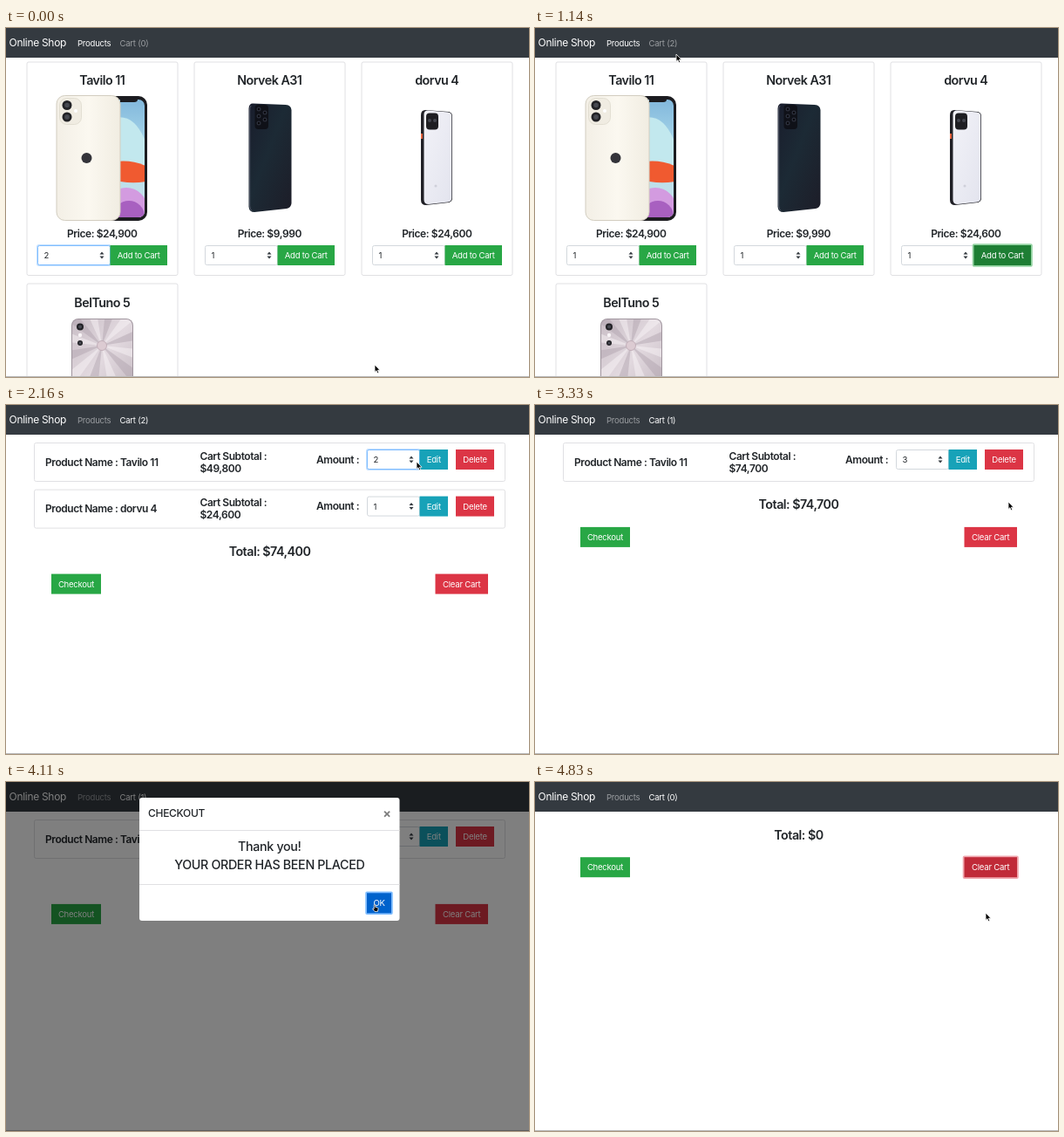
These frames come from a looping animation (600x400 px, 4980 ms). An HTML page:

```html
<!DOCTYPE html>
<html lang="en">
<head>
<meta charset="utf-8">
<title>Online Shop</title>
<style>
  html, body { margin: 0; width: 100%; height: 100%; overflow: hidden; background: #fff; }
  svg { display: block; width: 600px; height: 400px; }
  text { font-family: Inter, Roboto, sans-serif; letter-spacing: -.025em; white-space: pre; }
  text[font-weight="600"] { letter-spacing: -.036em; }
</style>
</head>
<body>
<svg viewBox="0 0 600 400">
  <defs>
    <linearGradient id="cream"><stop stop-color="#f3efe6"/><stop offset=".5" stop-color="#fbf8f0"/><stop offset="1" stop-color="#f1ede2"/></linearGradient>
    <linearGradient id="screen" x2="0" y2="1"><stop stop-color="#82b8dc"/><stop offset=".5" stop-color="#b4e0ee"/><stop offset="1" stop-color="#c9dfe6"/></linearGradient>
    <linearGradient id="night" x2="1" y2="1"><stop stop-color="#191d2c"/><stop offset=".45" stop-color="#1c2a35"/><stop offset="1" stop-color="#1d1d28"/></linearGradient>
    <linearGradient id="mint" x2="1" y2="1"><stop stop-color="#f2f2f8"/><stop offset="1" stop-color="#e3e4ee"/></linearGradient>
    <linearGradient id="silver" x2="1" y2="1"><stop stop-color="#c9bec6"/><stop offset=".5" stop-color="#e2d9df"/><stop offset="1" stop-color="#c4b9c1"/></linearGradient>
    <clipPath id="screenClip"><rect x="116" y="82" width="43" height="135" rx="7"/></clipPath>
    <clipPath id="silverClip"><rect x="76" y="334" width="69" height="90" rx="7"/></clipPath>
  </defs>
  <g id="view"></g>
  <g id="cursor"></g>
</svg>
<script>
const LOOP = 4980, STEP = 30;
const INK = '#212529', LINE = '#e0e0e3', WHITE = '#fff';
const SKIN = {
  green: ['#28a745', '#1e7e34', '#94d3a2'],
  red: ['#dc3545', '#c02a38', '#f0a6ad'],
  teal: ['#17a2b8', '#138496', '#8bd0db'],
  blue: ['#007bff', '#0062cc', '#80bdff']
};
const PHONES = ['Tavilo 11', 'Norvek A31', 'dorvu 4', 'BelTuno 5'];
const PRICES = [24900, 9990, 24600];

// Each entry changes part of the state from its time on.
const STATES = [
  [0, { page: 'shop', count: 0, amounts: [2, 1, 1], focus: 'select0' }],
  [330, { count: 1, amounts: [1, 1, 1], focus: 'add0' }],
  [870, { count: 2, focus: 'add2' }],
  [1290, { page: 'cart', rows: [[0, 2, 2], [2, 1, 1]], focus: '' }],
  [2040, { focus: 'amount0' }],
  [2250, { rows: [[0, 3, 2], [2, 1, 1]] }],
  [2490, { focus: 'edit0' }],
  [2520, { rows: [[0, 3, 3], [2, 1, 1]] }],
  [3060, { focus: 'delete1' }],
  [3120, { count: 1, rows: [[0, 3, 3]], focus: '' }],
  [3600, { focus: 'checkout' }],
  [3720, { focus: '' }],
  [4050, { focus: 'ok' }],
  [4200, { focus: '' }],
  [4530, { focus: 'clear' }],
  [4590, { count: 0, rows: [] }]
];

// time, x, y of the pointer tip
const PATH = [
  [0, 423, 386], [270, 157, 262], [360, 157, 262], [780, 537, 262], [900, 537, 262],
  [1140, 162, 30], [1200, 150, 19], [1320, 150, 19], [1890, 471, 65], [2280, 471, 65],
  [2430, 491, 64], [2580, 491, 64], [2910, 543, 111], [3330, 543, 111], [3570, 82, 151],
  [3720, 82, 151], [4020, 423, 140], [4170, 423, 140], [4380, 517, 150], [LOOP, 517, 150]
];
// spans in which the pointer rests on something clickable
const HANDS = [[240, 390], [750, 930], [1170, 1350], [2400, 2610], [2880, 3120],
  [3540, 3720], [3990, 4170], [4350, 4590]];

const money = n => '$' + n.toLocaleString('en-US');
const rect = (x, y, w, h, fill, more = '') =>
  `<rect x="${x}" y="${y}" width="${w}" height="${h}" fill="${fill}" ${more}/>`;
const circle = (x, y, r, fill, more = '') => `<circle cx="${x}" cy="${y}" r="${r}" fill="${fill}" ${more}/>`;
const shape = (d, fill, more = '') => `<path d="${d}" fill="${fill}" ${more}/>`;
const text = (x, y, str, size = 9.55, fill = INK, weight = 400, anchor = 'start') =>
  `<text x="${x}" y="${y}" font-size="${size}" fill="${fill}" font-weight="${weight}" text-anchor="${anchor}">${str}</text>`;
const heading = (x, y, str, size = 12, anchor = 'start') => text(x, y, str, size, INK, 600, anchor);
const frame = (x, y, w, h) => rect(x + .5, y + .5, w, h, 'none', `rx="2" stroke="${LINE}"`);

function button(x, y, w, label, skin, focused) {
  const [base, dark, ring] = SKIN[skin];
  return (focused ? rect(x - 1.8, y - 1.8, w + 3.6, 26.6, ring, 'rx="2"') : '') +
    rect(x, y, w, 23, focused ? dark : base) +
    text(x + w / 2, y + 15, label, 9.55, WHITE, 400, 'middle');
}

function select(x, y, w, value, focused) {
  const ring = focused ? rect(x - 1, y - 1, w + 2, 25, '#bfdeff', 'rx="3"') : '';
  const ax = x + w - 10;
  return ring + rect(x + .5, y + .5, w - 1, 22, WHITE, `rx="2" stroke="${focused ? '#80bdff' : '#d3d8dd'}"`) +
    text(x + 7.5, y + 15, value) +
    shape(`M${ax - 2.5} ${y + 10.5}l2.5 -3l2.5 3zm0 2l2.5 3l2.5 -3z`, '#343a40');
}

function lens(x, y, r) {
  return circle(x, y, r, '#222226') + circle(x, y, r * .5, '#484a52');
}

const creamPhone =
  rect(112, 78, 50, 143, '#1c1c20', 'rx="10"') +
  `<g clip-path="url(#screenClip)">${rect(116, 82, 43, 135, 'url(#screen)')}` +
  shape('M116 106Q145 92 160 130V160Q140 152 116 156Z', '#c2e8ee') +
  shape('M116 155Q140 149 160 158V176Q140 180 116 172Z', '#f05a30') +
  circle(138, 207, 24, '#d39be0') + circle(141, 216, 18, '#a860c0') + '</g>' +
  shape('M131 79H151V82Q151 85 147 85H131Z', '#1c1c20') +
  rect(58, 77.5, 73, 143, 'url(#cream)', 'rx="9.5" stroke="#d2cdc0"') +
  rect(61.5, 80.5, 25, 30, '#f0ece2', 'rx="8" stroke="#dcd7cb" stroke-width=".7"') +
  lens(70, 88.5, 5.5) + lens(70, 102, 5.5) + circle(80, 95, 2, WHITE) +
  circle(92.5, 149, 6, '#34343a');

const darkPhone =
  shape('M283 86.5L321 88Q327 88.5 327.5 94V201Q327 206 322 207L285 211Q279 211 278.5 205V92Q279 86.5 283 86.5Z', 'url(#night)') +
  shape('M281 89Q279.5 91 279.7 95V204Q280 208 282 209.5', 'none', 'stroke="#565b6a"') +
  rect(285.5, 88, 15.5, 28, '#0f1118', 'rx="4"') +
  [[290, 93], [290, 101], [290, 109], [297, 97], [297, 105]].map(p => circle(...p, 2.5, '#2c303c') + circle(...p, 1.2, '#08080c')).join('');

const whitePhone =
  shape('M481 94L508 96Q512 97 512 101V195Q512 199 508 200L482 203Q476 203 476 197V100Q476 94 481 94Z', '#202026') +
  shape('M484 94.5L507 96.5Q511.3 97 511.3 101V195Q511 199 507 199.5L485 202Q479.5 202 479.5 197V99Q479.5 94.5 484 94.5Z', 'url(#mint)') +
  rect(482, 97.5, 14, 19, '#1e1e22', 'rx="4"') +
  circle(486, 106, 2, '#44464e') + circle(492, 106, 2, '#44464e') +
  rect(476, 121, 2, 6, '#ea6440') + circle(493, 181, 1.5, '#cfd0da');

const rays = Array.from({ length: 12 }, (_, i) => {
  const edge = a => `${110 + 90 * Math.cos(a)} ${364 + 90 * Math.sin(a)}`;
  const a = i * Math.PI / 6 + .1;
  return shape(`M110 364L${edge(a)}L${edge(a + .27)}Z`, i % 2 ? '#ada1ab' : '#faf5f8', 'opacity=".45"');
}).join('');
const silverPhone =
  rect(75, 333, 71, 92, '#a0959e', 'rx="8"') + rect(76, 334, 69, 90, 'url(#silver)', 'rx="7"') +
  `<g clip-path="url(#silverClip)">${rays}</g>` +
  lens(85, 342.5, 4) + circle(85, 352, 2.2, '#f8f4f6') + lens(85, 361, 3) +
  circle(110, 364, 5.5, '#dccbd2', 'stroke="#bca8b2" stroke-width=".8"');

const photos = creamPhone + darkPhone + whitePhone + silverPhone;

function shopPage({ amounts, focus }) {
  const cards = PRICES.map((price, i) => {
    const x = 24 + 192 * i;
    return frame(x - .5, 38.5, 173, 244.5) +
      heading(x + 86.3, 65, PHONES[i], 14.3, 'middle') +
      heading(x + 86.3, 240, 'Price: ' + money(price), 12, 'middle') +
      select(x + 12, 249, 84, amounts[i], focus === 'select' + i) +
      button(x + 95.5, 249, 65.5, 'Add to Cart', 'green', focus === 'add' + i);
  });
  return cards.join('') + frame(23.5, 292.5, 173, 200) +
    heading(110.3, 319.5, PHONES[3], 14.3, 'middle') + photos;
}

function cartPage({ rows, focus }) {
  let total = 0;
  const lines = rows.map(([phone, shown, amount], i) => {
    const y = 43 + 53.6 * i, sum = PRICES[phone] * amount;
    total += sum;
    return frame(32, y, 540, 44) +
      heading(45, y + 26.5, 'Product Name : ' + PHONES[phone]) +
      heading(222.5, y + 19.5, 'Cart Subtotal :') + heading(222.5, y + 33.8, money(sum)) +
      heading(356, y + 23.7, 'Amount :') +
      select(414, y + 8, 61, shown, focus === 'amount' + i) +
      button(474.5, y + 8, 32.5, 'Edit', 'teal', focus === 'edit' + i) +
      button(516, y + 8, 44, 'Delete', 'red', focus === 'delete' + i);
  });
  const y = 53.7 * rows.length;
  return lines.join('') + heading(302.5, 65.5 + y, 'Total: ' + money(total), 14.3, 'middle') +
    button(52, 86.2 + y, 57, 'Checkout', 'green', focus === 'checkout') +
    button(492.5, 86.2 + y, 60.5, 'Clear Cart', 'red', focus === 'clear');
}

function navbar({ page, count }) {
  const tint = name => page === name ? WHITE : '#9a9da0';
  return rect(0, 0, 600, 34, '#343a40') + text(3.5, 21.3, 'Online Shop', 12, WHITE) +
    text(82, 20.7, 'Products', 9.55, tint('shop')) +
    text(130.5, 20.7, `Cart (${count})`, 9.55, tint('cart'));
}

function modal(shown, focus) {
  if (!shown) return '';
  return rect(0, 0, 600, 400, '#000', `opacity="${shown / 2}"`) +
    `<g opacity="${shown}" transform="translate(0 ${-30 * (1 - shown)})">` +
    rect(153, 18, 298.5, 141, WHITE, 'rx="3"') +
    text(163, 40.4, 'CHECKOUT', 12, INK, 500) +
    text(437, 40.5, '×', 14.3, '#7f7f7f', 700, 'middle') +
    rect(153, 55, 298.5, 1, LINE) + rect(153, 117, 298.5, 1, LINE) +
    text(302.3, 78.7, 'Thank you!', 14.3, INK, 500, 'middle') +
    text(302.3, 100.2, 'YOUR ORDER HAS BEEN PLACED', 14.3, INK, 500, 'middle') +
    button(414, 127.3, 28, 'OK', 'blue', focus === 'ok') + '</g>';
}

const clamp = v => Math.min(1, Math.max(0, v));
const modalShown = t => clamp((t - 3652) / 60) * clamp((4190 - t) / 60);

function pointerAt(t) {
  const i = PATH.findIndex(p => p[0] > t);
  const [t0, x0, y0] = PATH[i - 1], [t1, x1, y1] = PATH[i];
  const u = (t - t0) / (t1 - t0), e = u * u * (3 - 2 * u);
  return [x0 + (x1 - x0) * e, y0 + (y1 - y0) * e];
}

const outline = 'stroke="#fff" stroke-width=".8" stroke-linejoin="round"';
const arrow = shape('M0 0V8.4L1.9 6.7L3.2 9.8L4.7 9.1L3.4 6.2H6Z', '#000', outline);
const hand = shape('M-.8 .6Q0 -.6 .8 .6V3.4L3.4 4Q4.2 4.4 4 5.6L3.4 8.4H0L-2.4 5.4Q-2.2 4.4 -.8 5.4Z', '#000', outline);

const view = document.getElementById('view'), cursor = document.getElementById('cursor');
let lastMarkup = '';

function render(now) {
  const t = Math.floor(now % LOOP / STEP) * STEP;
  const state = Object.assign({}, ...STATES.filter(s => s[0] <= t).map(s => s[1]));
  const page = state.page === 'shop' ? shopPage(state) : cartPage(state);
  const markup = rect(0, 0, 600, 400, WHITE) + page + navbar(state) +
    rect(0, 399, 600, 1, '#b9b9b9') + modal(modalShown(t), state.focus);
  if (markup !== lastMarkup) view.innerHTML = lastMarkup = markup;

  const [x, y] = pointerAt(t);
  cursor.innerHTML = HANDS.some(([a, b]) => t >= a && t < b) ? hand : arrow;
  cursor.setAttribute('transform', `translate(${x} ${y})`);
}

const start = performance.now();
function tick() {
  render(performance.now() - start);
  requestAnimationFrame(tick);
}
tick();
</script>
</body>
</html>
```
